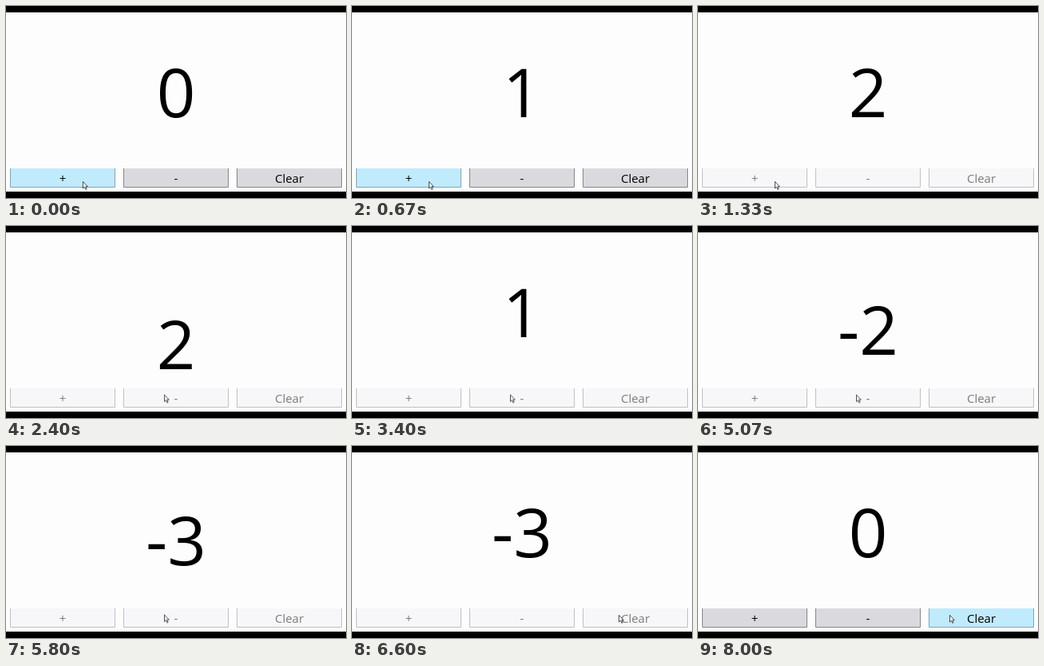
Write an HTML page that moves like this. It is 426 by 240 pixels and loops after 8.07 s.

```html
<!DOCTYPE html>
<html lang="en">
<head>
<meta charset="utf-8">
<title>Counter</title>
<style>
  html, body { margin: 0; width: 100%; height: 100%; overflow: hidden; background: #000; }
  svg { display: block; width: 100vw; height: 100vh; }
  text { font-family: "Open Sans", "Noto Sans", sans-serif; text-anchor: middle; }
  #count { font-size: 85px; }
  .button { fill: #dadade; stroke: #85858a; }
  .button text { font-size: 15px; fill: #000; stroke: none; }
  .hover { fill: #c0ebfc; stroke: #7fa5b5; }
  .off { fill: #f7f7f9; stroke: #bfc0c4; }
  .off text { fill: #7c7c7c; }

  /* pointer: from + to -, on to Clear, then a small step aside */
  #cursor { animation: point 8070ms infinite; }
  @keyframes point {
    0%, 24% { transform: translate(96px, 219px); }
    28%, 77% { transform: translate(198px, 210.5px); }
    80.5%, 82.5% { transform: translate(334px, 211px); }
    86%, 100% { transform: translate(315px, 211px); }
  }
</style>
</head>
<body>
<svg viewBox="0 0 426 240">
  <rect y="8" width="426" height="224" fill="#fdfdfd"/>
  <text id="count" x="213" y="139">0</text>
  <g id="buttons"></g>
  <path id="cursor" d="M.5 .5V9L2.4 7.2L3.8 10.3L5.1 9.7L3.8 6.7H6.3Z"
        fill="#fff" stroke="#222" stroke-width=".8"/>
</svg>
<script>
  const LOOP = 8070, PRESS = 100, BUSY = 550, SLIDE = 400, DROP = 40;

  // Each button is clicked a number of times at an even pace.
  const actions = [
    { label: "+", start: 200, gap: 600, clicks: 3, apply: n => n + 1 },
    { label: "-", start: 2400, gap: 650, clicks: 6, apply: n => n - 1 },
    { label: "Clear", start: 6700, gap: 0, clicks: 1, apply: () => 0 }
  ];

  const count = document.getElementById("count");
  const group = document.getElementById("buttons");
  group.innerHTML = actions.map(({ label }, i) => `
    <g class="button" transform="translate(${5 + 142 * i} 203)">
      <path d="M.5 0V23.5H131.5V0"/>
      <text x="66" y="18">${label}</text>
    </g>`).join("");
  const buttons = [...group.children];
  const motion = document.getElementById("cursor").getAnimations()[0];
  motion.pause();

  function stateAt(t) {
    let value = 0, since = -LOOP, busy = false, hovered = 0;
    actions.forEach(({ start, gap, clicks, apply }, i) => {
      if (t >= start - 300) hovered = i;
      for (let k = 0; k < clicks; k++) {
        const at = start + gap * k, age = t - at + PRESS;
        busy ||= age >= 0 && age < BUSY;
        if (t >= at) {
          value = apply(value);
          since = at;
        }
      }
    });
    return { value, since, busy, hovered };
  }

  function draw(now) {
    const t = now % LOOP;
    const { value, since, busy, hovered } = stateAt(t);
    const left = 1 - Math.min(1, (t - since) / SLIDE);

    count.textContent = value;
    count.setAttribute("y", 139 + DROP * left ** 3);
    buttons.forEach((b, i) => {
      b.classList.toggle("off", busy);
      b.classList.toggle("hover", !busy && i === hovered);
    });
    motion.currentTime = t;
    requestAnimationFrame(draw);
  }
  draw(0);
</script>
</body>
</html>
```
